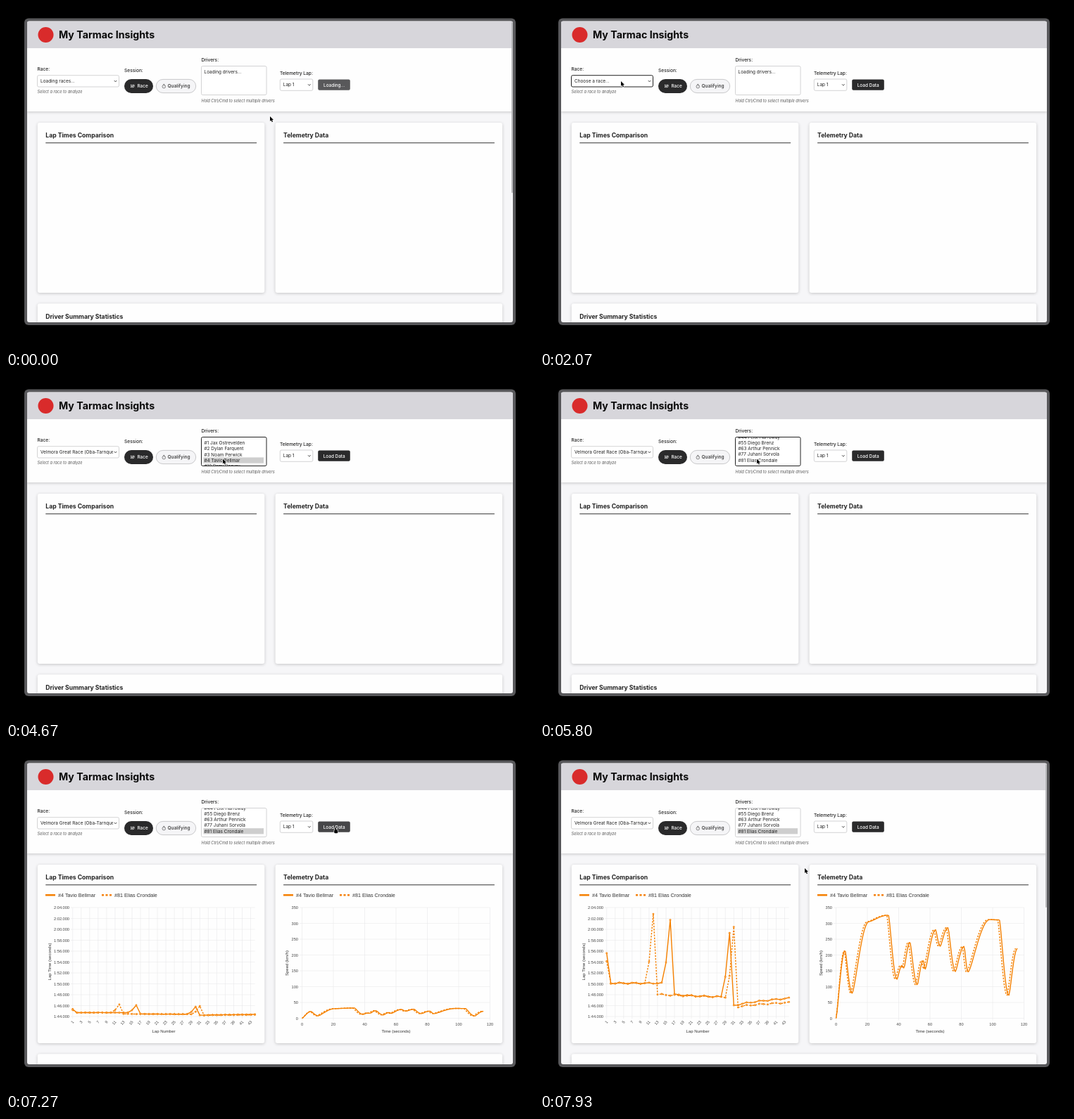
Animation, 750 px wide and 488 px high, one loop 8 s. Source, as an HTML page with a canvas:

```html
<!DOCTYPE html>
<html lang="en">
<head>
<meta charset="utf-8">
<title>My Tarmac Insights</title>
<style>
html, body { margin: 0; width: 100%; height: 100%; overflow: hidden; background: #000; }
canvas { display: block; width: 750px; height: 488px; }
</style>
</head>
<body>
<canvas id="stage"></canvas>
<script>
const LOOP = 8000, UI = 'Inter, sans-serif', CHART = '"Liberation Sans", sans-serif';
const ORANGE = '#f58000', DARK = '#2a2a2b', GRID = '#e4e4e6';
const canvas = document.getElementById('stage');
const ratio = window.devicePixelRatio || 1;
canvas.width = 750 * ratio;
canvas.height = 488 * ratio;
const c = canvas.getContext('2d');

const RACE = 'Velmora Great Race (Oba-Tarnquelden)';
const FIRST = '#4 Tavio Bellmar', SECOND = '#81 Elias Crondale';
const DRIVERS = ['#1 Jax Ostrevelden', '#2 Dylan Farquent', '#3 Noam Perwick', FIRST,
  '#10 Remi Dorvay', '#11 Paco Linarez', '#14 Benito Solura', '#16 Luca Ferandi',
  '#18 Owen Trask', '#20 Nils Hagebro', '#22 Kenji Morota', '#23 Arun Velsak',
  '#24 Shen Guolin', '#27 Jonas Hellbeck', '#31 Tristan Corval', '#44 Felix Harroway',
  '#55 Diego Brenz', '#63 Arthur Pennick', '#77 Juhani Sorvola', SECOND];
const ROW = 8.15, LIST_END = 130.6;

// pointer moves: start, end, target x, target y
const MOVES = [[880, 1530, 115, 107], [2300, 3330, 309.5, 100], [3800, 4270, 308, 116.5],
  [6270, 7070, 468, 113], [7270, 7600, 395.5, 151], [7600, 7930, 376, 171]];

const RUNS = [
  { pits: [16, 30], opening: 115.8, pitLoss: 11.9, finish: 107.4, lead: 0, dash: [] },
  { pits: [12, 31], opening: 114.3, pitLoss: 13, finish: 106.6, lead: 1.1, dash: [2.4, 1.8] }
];

// seconds and km/h at each corner and straight
const SPEEDS = [[0, 0], [5.8, 218], [10.3, 80], [21, 310], [33.5, 331], [38.9, 125], [42.2, 170],
  [43.4, 161], [47.2, 245], [51.9, 107], [55.7, 186], [57, 158], [63.6, 284], [66.5, 231],
  [71.5, 291], [76.2, 150], [81.8, 231], [84.3, 148], [98.2, 317], [104.3, 316], [110.3, 73],
  [115.8, 224]];

const clamp = (v) => Math.max(0, Math.min(1, v));
const ramp = (t, from, to) => clamp((t - from) / (to - from));
const mix = (a, b, p) => a + (b - a) * p;
const smooth = (p) => p * p * (3 - 2 * p);
const easeOutQuart = (p) => 1 - Math.pow(1 - p, 4);

function lapTime(run, lap) {
  if (lap === 1) return run.opening;
  const stops = [0, ...run.pits, 44];
  const stint = stops.findIndex((stop) => lap <= stop) - 1;
  const [from, to] = [[110.2, 110.2], [108.3, 107.6], [105.5, run.finish]][stint];
  const spent = (lap - stops[stint]) / (stops[stint + 1] - stops[stint]);
  const pace = mix(from, to, Math.sqrt(spent)) + 0.12 * Math.sin(lap * 1.9);
  const untilPit = run.pits[stint] - lap;
  return pace + (untilPit === 0 ? run.pitLoss : untilPit === 1 ? 3.9 : 0);
}

function speedAt(s) {
  const i = Math.max(1, SPEEDS.findIndex((key) => key[0] >= s));
  const [s0, v0] = SPEEDS[i - 1], [s1, v1] = SPEEDS[i];
  return mix(v0, v1, smooth(Math.pow(ramp(s, s0, s1), 0.75)));
}

function box(x, y, w, h, r, fill, stroke, width = 0.8) {
  c.beginPath();
  c.roundRect(x, y, w, h, r);
  if (fill) { c.fillStyle = fill; c.fill(); }
  if (stroke) { c.strokeStyle = stroke; c.lineWidth = width; c.stroke(); }
}

function dot(x, y, r, fill) {
  c.beginPath();
  c.arc(x, y, r, 0, Math.PI * 2);
  c.fillStyle = fill;
  c.fill();
}

function line(points, color, width = 0.8, dash = []) {
  c.beginPath();
  points.forEach(([x, y]) => c.lineTo(x, y));
  c.strokeStyle = color;
  c.lineWidth = width;
  c.lineJoin = 'round';
  c.setLineDash(dash);
  c.stroke();
  c.setLineDash([]);
}

// y is the middle of the capitals
function text(str, x, y, size, { style = '', font = UI, color = '#222', align = 'left', turn = 0 } = {}) {
  c.save();
  c.translate(x, y);
  c.rotate(turn);
  c.font = `${style} ${size}px ${font}`;
  c.fillStyle = color;
  c.textAlign = align;
  c.fillText(str, 0, size * 0.36);
  c.restore();
}

function clipped(x, y, w, h, draw) {
  c.save();
  c.beginPath();
  c.rect(x, y, w, h);
  c.clip();
  draw();
  c.restore();
}

function shadowBox(x, y, w, h, r) {
  c.save();
  c.shadowColor = 'rgba(0,0,0,.2)';
  c.shadowBlur = 4 * ratio;
  c.shadowOffsetY = ratio;
  box(x, y, w, h, r, '#fefefe');
  c.restore();
}

function field(x, y, w, h, focused) {
  box(x, y, w, h, 2, '#fff', focused ? '#222' : '#c8c8ca', focused ? 1 : 0.8);
}

function select(label, x, y, w, h, focused) {
  field(x, y, w, h, focused);
  clipped(x, y, w - 8.5, h, () => text(label, x + 4.5, y + h / 2, 6.45));
  const cx = x + w - 5, cy = y + h / 2;
  line([[cx - 1.8, cy - 0.9], [cx, cy + 1], [cx + 1.8, cy - 0.9]], '#333', 0.9);
}

function flagIcon(x, y) {
  for (let i = 0; i < 12; i++) {
    const col = i % 4, row = Math.floor(i / 4);
    c.fillStyle = (col + row) % 2 ? '#777' : '#e4e4e4';
    c.fillRect(x + col * 1.4, y + row * 1.4 + Math.sin(col * 1.5) * 0.4, 1.4, 1.4);
  }
}

function watchIcon(x, y) {
  box(x - 2.3, y - 2.3, 4.6, 4.6, 2.3, null, '#555', 0.7);
  line([[x, y], [x + 1, y - 1.2]], '#555', 0.6);
  line([[x - 0.9, y - 3.2], [x + 0.9, y - 3.2]], '#555');
}

function driverList(t) {
  field(277.5, 85.5, 92.5, 41, t >= 4530 && t < 7100);
  if (t < 2700) return text('Loading drivers...', 281.5, 94, 6.45);
  const scroll = LIST_END * smooth(ramp(t, 5130, 5560));
  const picked = (i) => t < 4670 ? i < 3 : i === 3 || (i === 19 && t >= 6070);
  clipped(278, 86, 91.5, 40, () => {
    DRIVERS.forEach((name, i) => {
      const y = 94 + i * ROW - scroll;
      if (picked(i)) {
        c.fillStyle = '#cecece';
        c.fillRect(280.5, y - 4.05, 85.5, ROW + 0.05);
      }
      text(name, 281.5, y, 6.45);
    });
    const barShown = t < 4530 || (t >= 5130 && t < 5700);
    if (barShown) box(367.4, 87 + 22 * scroll / LIST_END, 1.8, 16.5, 1, '#c2c2c4');
  });
}

function controls(t) {
  shadowBox(30, 55, 690, 95, 0);
  c.fillStyle = '#d7d6db';
  c.fillRect(30, 21.5, 690, 38.5);
  dot(56.5, 41, 11, '#d92b2b');
  text('My Tarmac Insights', 75, 41.2, 14.2, { style: 'bold', color: '#0a0a0a' });

  const label = { style: '500' }, hint = { style: 'italic', color: '#555' };
  text('Race:', 44.5, 89.7, 6.6, label);
  text('Session:', 168, 91.5, 6.6, label);
  text('Drivers:', 277.5, 76.7, 6.6, label);
  text('Telemetry Lap:', 389, 95.2, 6.6, label);
  text('Select a race to analyze', 44.5, 121.5, 5.6, hint);
  text('Hold Ctrl/Cmd to select multiple drivers', 277.5, 134.5, 5.6, hint);

  const race = t < 200 ? 'Loading races...' : t < 2400 ? 'Choose a race...' : RACE;
  select(race, 44.5, 98.7, 116, 16.3, t >= 1870 && t < 4530);
  select('Lap 1', 389.3, 104, 46.5, 16.3, false);

  box(168, 104, 41, 20, 10, DARK);
  flagIcon(177, 111.8);
  text('Race', 186.5, 114, 6.4, { style: '500', color: '#fff' });
  box(213.3, 104.4, 56.4, 19.2, 9.6, '#f5f5f7', '#bbbbbe');
  watchIcon(224.3, 114.6);
  text('Qualifying', 229.5, 114, 6.6, { style: '500', color: '#333' });

  driverList(t);

  const loading = t < 200 || (t >= 7130 && t < 7200);
  const hover = t > 6900 && t < 7330;
  box(443.2, 104.5, 45.6, 15.3, 2, loading ? '#58585a' : hover ? '#464648' : DARK);
  text(loading ? 'Loading...' : 'Load Data', 466.2, 112.2, 6.4,
    { style: '500', color: '#fff', align: 'center' });
}

function card(title, x, h) {
  shadowBox(x, 166, 322.5, h, 3);
  text(title, x + 11.5, 184.3, 8.65, { style: 'bold' });
  line([[x + 11.5, 194.8], [x + 311.3, 194.8]], '#333', 1.1);
}

const TICK = { font: CHART, color: '#444', align: 'right' };
const TITLE = { font: CHART, color: '#333', align: 'center' };

function legend(x) {
  [FIRST, SECOND].forEach((name, i) => {
    const left = x + i * 80;
    line([[left, 209.3], [left + 14, 209.3]], ORANGE, 2.6, i ? [3, 2.5] : []);
    text(name, left + 18, 209.3, 7.2, { font: CHART, color: '#333' });
  });
}

function rows(count, gap, left, right, label) {
  for (let i = 0; i < count; i++) {
    const y = 227 + i * gap;
    line([[left, y], [right, y]], GRID, 0.5);
    text(label(i), left - 1.5, y, 5.65, TICK);
  }
}

function lapChart(p) {
  const lapX = (lap) => 94.7 + (lap - 1) * 6.02;
  legend(56);
  rows(11, 15.5, 91.5, 353.6, (i) => {
    const sec = 124 - i * 2;
    return `${Math.floor(sec / 60)}:${String(sec % 60).padStart(2, '0')}.000`;
  });
  for (let lap = 1; lap <= 43; lap += 2) {
    const x = lapX(lap);
    line([[x, 227], [x, 385]], GRID, 0.5);
    text(String(lap), x + 0.6, 388.6, 5.5, { ...TICK, turn: -0.87 });
  }
  text('Lap Number', 224, 403, 6, TITLE);
  text('Lap Time (seconds)', 61.5, 304, 6, { ...TITLE, turn: -Math.PI / 2 });
  RUNS.forEach((run) => {
    const points = [];
    for (let lap = 1; lap <= 44; lap++) {
      points.push([lapX(lap), 382 - (lapTime(run, lap) - 104) * 7.75 * p]);
    }
    line(points, ORANGE, 1.4, run.dash);
    points.forEach(([x, y]) => {
      dot(x, y, 1.4, ORANGE);
      dot(x, y, 0.7, '#fbb871');
    });
  });
}

function speedChart(p) {
  legend(394);
  rows(8, 22.5, 416.5, 687.6, (i) => String(350 - i * 50));
  for (let s = 0; s <= 120; s += 20) {
    const x = 420.5 + s * 2.225;
    line([[x, 227], [x, 387.5]], GRID, 0.5);
    text(String(s), x, 393, 5.65, { ...TICK, align: 'center' });
  }
  text('Time (seconds)', 554, 403, 6, TITLE);
  text('Speed (km/h)', 399, 306, 6, { ...TITLE, turn: -Math.PI / 2 });
  RUNS.forEach((run) => {
    const points = [];
    for (let s = 0; s <= 115.8; s += 0.6) {
      const shown = s - run.lead * clamp(s / 12);
      points.push([420.5 + shown * 2.225, 384.5 - speedAt(s) * 0.45 * p]);
    }
    line(points, ORANGE, 1.4, run.dash);
  });
}

function pageScrollbar(t) {
  const loaded = t > 7000;
  c.globalAlpha = loaded ? ramp(t, 7330, 7420) : 1 - ramp(t, 70, 330);
  box(718, 23, 1.8, loaded ? 204 : 243, 0.9, '#b4b4b7');
  c.globalAlpha = 1;
}

function pointer(t) {
  let x = 375, y = 157;
  MOVES.forEach(([from, to, toX, toY]) => {
    const raw = ramp(t, from, to), p = from < 7000 ? smooth(raw) : raw;
    x = mix(x, toX, p);
    y = mix(y, toY, p);
  });
  c.save();
  c.translate(x, y);
  c.beginPath();
  if (t > 6900 && t < 7330) {
    c.roundRect(-0.8, 0, 1.7, 6, 0.8);
    c.roundRect(-1.6, 3.2, 5.2, 5, 1.5);
  } else {
    c.moveTo(0, 0);
    c.lineTo(0, 7);
    c.lineTo(1.6, 5.6);
    c.lineTo(2.8, 8.2);
    c.lineTo(4, 7.6);
    c.lineTo(2.9, 5.2);
    c.lineTo(5, 5);
    c.closePath();
  }
  c.lineJoin = 'round';
  c.lineWidth = 1.3;
  c.strokeStyle = '#fff';
  c.stroke();
  c.fillStyle = '#000';
  c.fill();
  c.restore();
}

function draw(t) {
  c.setTransform(ratio, 0, 0, ratio, 0, 0);
  c.fillStyle = '#000';
  c.fillRect(0, 0, 750, 488);
  box(26, 17.5, 698, 436.5, 6, '#58585b');
  c.save();
  box(30, 21.5, 690, 428.5, 3, '#f6f6f8');
  c.clip();
  const loaded = t >= 7200, grown = loaded ? 12 : 0;
  controls(t);
  card('Lap Times Comparison', 44.8, 242 + grown);
  card('Telemetry Data', 382.6, 242 + grown);
  shadowBox(44.8, 423.3 + grown, 660.3, 60, 3);
  text('Driver Summary Statistics', 56.3, 441.6 + grown, 8.65, { style: 'bold' });
  if (loaded) {
    lapChart(easeOutQuart(ramp(t, 7239, 8302)));
    speedChart(easeOutQuart(ramp(t, 7244, 8307)));
  }
  pageScrollbar(t);
  pointer(t);
  c.restore();
}

const start = performance.now();
function tick() {
  draw((performance.now() - start) % LOOP);
  requestAnimationFrame(tick);
}
tick();
</script>
</body>
</html>
```
